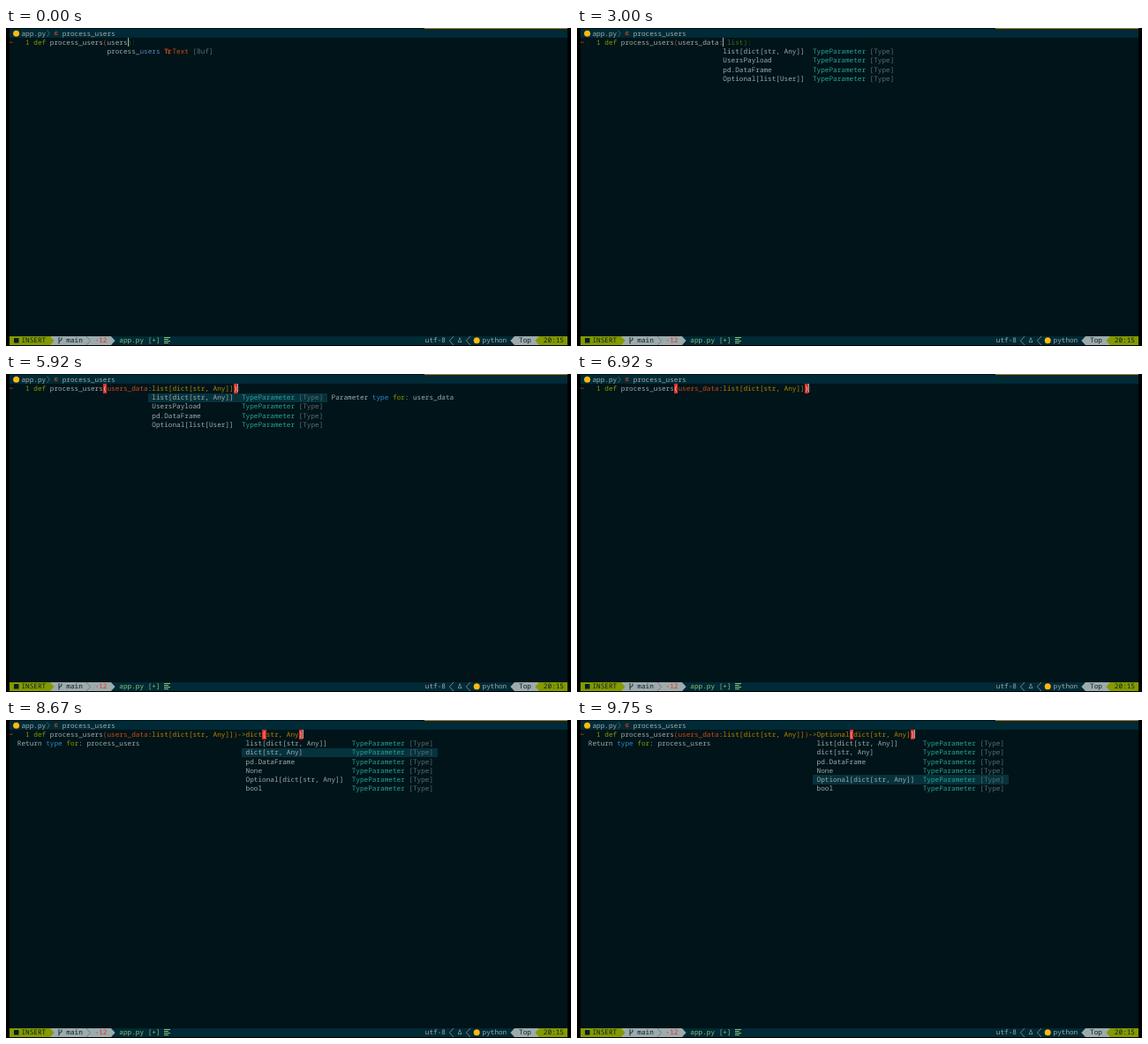
An HTML page with a canvas that plays this animation: 640x360 px, repeating every 9830 ms.

```html
<!DOCTYPE html>
<html lang="en">
<head>
<meta charset="utf-8">
<title>Editor completion</title>
<style>
html, body { margin: 0; width: 100%; height: 100%; overflow: hidden; background: #000; }
canvas { display: block; width: 640px; height: 360px; }
</style>
</head>
<body>
<canvas id="stage" width="640" height="360"></canvas>
<script>
const ctx = document.getElementById('stage').getContext('2d');
const LOOP = 9830;
const LEFT = 3.6, TOP = 1.1, CELL = 4.62, LINE = 10.22, COLS = 137, STATUS = 34;
const FONT = '7.7px "Noto Sans Mono", monospace';
const C = {
  bg: '#001419', bar: '#002a35', select: '#06323c',
  text: '#9eabac', dim: '#576d74', ghost: '#486a14', green: '#859900',
  lime: '#8cc07c', yellow: '#b28500', orange: '#c94c16', red: '#db302d',
  blue: '#268bd3', match: '#5f82c0', cyan: '#29a298', icon: '#ffb90f',
  grey: '#9eabac', dark: '#002029'
};

const HEAD = 'def process_users(';
const PARAM = 'list[dict[str, Any]]';
const PARAM_TYPES = [PARAM, 'UsersPayload', 'pd.DataFrame', 'Optional[list[User]]'];
const RETURN_TYPES = [PARAM, 'dict[str, Any]', 'pd.DataFrame', 'None',
  'Optional[dict[str, Any]]', 'bool'];
const SIGNED = HEAD + 'users_data:' + PARAM;

const paramMenu = { items: PARAM_TYPES, col: 35, kind: 57, end: 78, pick: -1,
  doc: 'users_data', label: 'Parameter', docCol: 79 };
const returnMenu = { items: RETURN_TYPES, col: 58, kind: 84, end: 105, pick: -1,
  doc: 'process_users', label: 'Return', docCol: 2 };
const choose = (menu, pick) => ({ ...menu, pick });
const returned = (time, pick) =>
  [time, SIGNED + ')->' + RETURN_TYPES[pick], '', choose(returnMenu, pick)];

// Each step: start time, typed text, suggestion after the cursor, menu
const steps = [
  [0, HEAD + 'users', '):', 'buffer'],
  [330, HEAD + 'users_', 'data):'],
  [500, HEAD + 'users_d', 'ata):'],
  [670, HEAD + 'users_da', 'ta):'],
  [830, HEAD + 'users_dat', 'a):'],
  [1000, HEAD + 'users_data', '):'],
  [1750, HEAD + 'users_data:', ' list):'],
  [2170, HEAD + 'users_data:', ' list):', paramMenu],
  [3750, SIGNED, '):', choose(paramMenu, 0)],
  [5250, SIGNED + ')', ':', choose(paramMenu, 0)],
  [6670, SIGNED + ')', ':'],
  [7420, SIGNED + ')-', '>list[dict'],
  [8170, SIGNED + ')->', 'list[dict'],
  [8250, SIGNED + ')->', '', returnMenu],
  returned(8420, 0),
  returned(8580, 1),
  returned(8920, 2),
  returned(9170, 3),
  returned(9420, 4)
];

const colX = col => LEFT + col * CELL;
const rowY = row => TOP + row * LINE;

function rect(x, y, width, height, color) {
  ctx.fillStyle = color;
  ctx.fillRect(x, y, width, height);
}

// Cell backgrounds sit on whole pixels
function fill(col, row, width, color) {
  const x = Math.round(colX(col)), y = Math.round(rowY(row));
  const right = Math.min(636, Math.round(colX(col + width)));
  rect(x, y, right - x, Math.round(rowY(row + 1)) - y, color);
}

function write(text, col, row, color) {
  ctx.fillStyle = color;
  [...text].forEach((ch, i) => ctx.fillText(ch, colX(col + i), rowY(row) + 7.6));
}

function writeBold(text, col, row, color) {
  ctx.font = 'bold ' + FONT;
  write(text, col, row, color);
  ctx.font = FONT;
}

function runs(col, row, ...parts) {
  for (const [text, color] of parts) {
    write(text, col, row, color);
    col += text.length;
  }
}

function shape(points, color, stroke) {
  ctx.beginPath();
  points.forEach(([x, y]) => ctx.lineTo(x, y));
  if (stroke) {
    ctx.strokeStyle = color;
    ctx.lineWidth = stroke;
    ctx.stroke();
  } else {
    ctx.fillStyle = color;
    ctx.fill();
  }
}

// Powerline edge; dir is 1 for a tip on the right, -1 on the left
function edge(col, row, dir, color, stroke) {
  const x = Math.round(colX(dir > 0 ? col : col + 1));
  const y = Math.round(rowY(row)), bottom = Math.round(rowY(row + 1));
  shape([[x, y], [x + dir * CELL, (y + bottom) / 2], [x, bottom]], color, stroke);
}

function disc(x, y, radius, color) {
  ctx.fillStyle = color;
  ctx.beginPath();
  ctx.arc(x, y, radius, 0, Math.PI * 2);
  ctx.fill();
}

function drawBars() {
  rect(0, 0, 640, 360, '#000');
  rect(4, 0, 632, 359, C.bg);
  fill(0, 0, COLS, C.bar);
  rect(474, 0, 162, 1, '#b07a18');

  disc(11.6, 6.2, 3.5, C.icon);
  write('app.py', 3, 0, C.text);
  shape([[46.5, 2.6], [49.2, 6.2], [46.5, 9.8]], C.dim, 0.8);
  shape([[58.6, 4.6], [55.4, 4.6], [55.4, 7.6], [58.6, 7.6]], C.orange, 0.8);
  shape([[55.4, 6.1], [58.6, 6.1]], C.orange, 0.6);
  write('process_users', 13, 0, C.text);

  fill(0, STATUS, COLS, C.bar);
  fill(10, STATUS, 15, C.grey);
  edge(25, STATUS, 1, C.grey);
  fill(0, STATUS, 10, C.green);
  edge(10, STATUS, 1, C.green);
  rect(9, 351, 5.5, 5.5, C.dark);
  write('INSERT', 3, STATUS, C.dark);
  shape([[60, 350], [60, 357.5]], C.dark, 0.9);
  shape([[60, 355], [63, 353], [63, 350.5]], C.dark, 0.9);
  write('main', 14, STATUS, C.dark);
  edge(19, STATUS, 1, C.dim, 0.7);
  write('-12', 21, STATUS, C.red);
  write('app.py [+]', 27, STATUS, C.lime);
  [7, 5, 7, 5].forEach((width, i) => rect(179, 350 + i * 2, width, 1, C.lime));

  write('utf-8', 102, STATUS, C.grey);
  edge(108, STATUS, -1, C.grey, 0.7);
  write('Δ', 110, STATUS, C.grey);
  edge(112, STATUS, -1, C.grey, 0.7);
  disc(533.2, rowY(STATUS) + 5.1, 3.5, C.icon);
  write('python', 116, STATUS, C.grey);
  edge(123, STATUS, -1, C.grey);
  fill(124, STATUS, 6, C.grey);
  write('Top', 125, STATUS, C.dark);
  edge(129, STATUS, -1, C.green);
  fill(130, STATUS, 7, C.green);
  write('20:15', 131, STATUS, C.dark);
}

function matchingOpen(text) {
  const close = text.at(-1);
  if (close !== ']' && close !== ')') return -1;
  const open = close === ']' ? '[' : '(';
  let depth = 0;
  for (let i = text.length - 1; i >= 0; i--) {
    if (text[i] === close) depth++;
    if (text[i] === open && --depth === 0) return i;
  }
  return -1;
}

function drawCode(text, suggestion) {
  const body = text.slice(HEAD.length);
  const colon = body.indexOf(':') + 1;
  const typed = colon > 0 && body.length > colon;
  const end = 6 + text.length;

  writeBold('~', 0, 1, C.orange);
  write('1', 4, 1, C.green);
  runs(6, 1, ['def', C.green], [' process_users', C.text], ['(', C.orange]);
  if (typed) {
    const signature = SIGNED.length - HEAD.length;
    runs(24, 1,
      [body.slice(0, colon - 1), C.orange], [':', C.text],
      [body.slice(colon, signature), C.yellow],
      [body.slice(signature, signature + 1), C.orange],
      [body.slice(signature + 1, signature + 3), C.green],
      [body.slice(signature + 3), C.yellow]);
  } else {
    write(body, 24, 1, C.text);
  }
  write(suggestion, end, 1, C.ghost);

  const open = matchingOpen(text);
  if (open >= 0) {
    for (const i of [open, text.length - 1]) {
      fill(6 + i, 1, 1, C.red);
      write(text[i], 6 + i, 1, '#f0d8cc');
    }
  }
  rect(Math.round(colX(end)), Math.round(rowY(1)), 1, 10, C.text);
}

function drawBufferMenu() {
  runs(24, 2, ['process_', C.text], ['users', C.match]);
  writeBold('T', 38, 2, C.orange);
  writeBold('r', 38.8, 2, C.orange);
  write('Text', 40, 2, C.orange);
  write('[Buf]', 45, 2, C.dim);
}

function drawTypeMenu(menu) {
  menu.items.forEach((item, i) => {
    const row = i + 2;
    if (i === menu.pick) fill(menu.col - 1, row, menu.end - menu.col + 1, C.select);
    write(item, menu.col, row, C.text);
    write('TypeParameter', menu.kind, row, C.cyan);
    write('[Type]', menu.kind + 14, row, C.dim);
  });
  if (menu.pick >= 0) {
    runs(menu.docCol, 2, [menu.label + ' ', C.text], ['type', C.blue],
      [' ', C.text], ['for', C.green], [': ' + menu.doc, C.text]);
  }
}

function draw(now) {
  const time = now % LOOP;
  const [, text, suggestion, menu] = steps.findLast(step => step[0] <= time);
  ctx.font = FONT;
  ctx.textRendering = 'geometricPrecision';
  drawBars();
  drawCode(text, suggestion);
  if (menu === 'buffer') drawBufferMenu();
  else if (menu) drawTypeMenu(menu);
}

const start = performance.now();
function tick() {
  draw(performance.now() - start);
  requestAnimationFrame(tick);
}
tick();
</script>
</body>
</html>
```
